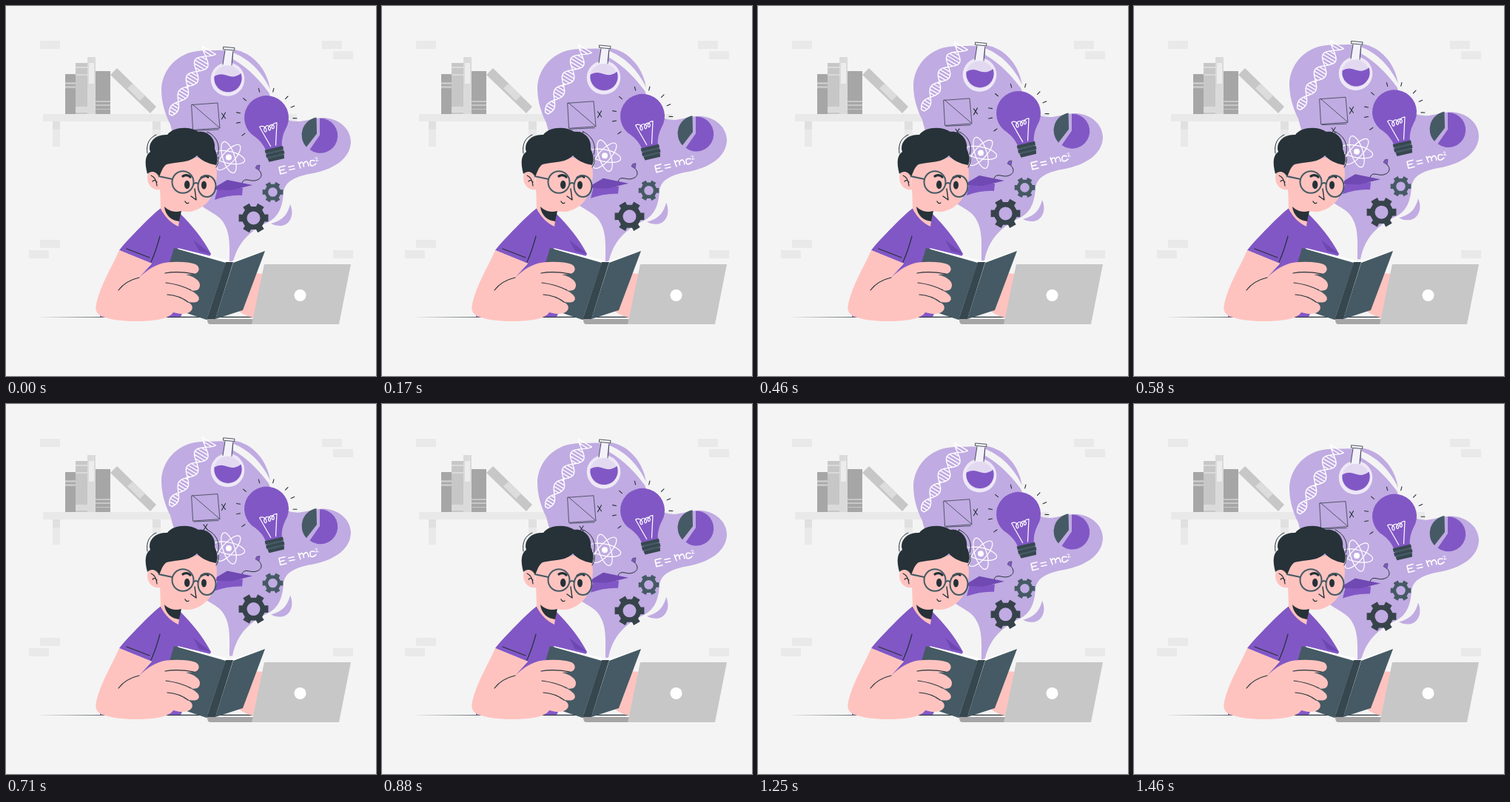
Animation of 500x500 px, one loop 1.5 s. Source, as an HTML page:

```html
<!DOCTYPE html>
<html lang="en">
<head>
<meta charset="utf-8">
<title>Reading and ideas</title>
<style>
  html, body { margin: 0; width: 100%; height: 100%; overflow: hidden; background: #f4f4f4; }
  svg { display: block; width: 100%; height: 100%; }
  .ink { fill: none; stroke: #263238; stroke-linecap: round; stroke-linejoin: round; }
  .chalk { fill: none; stroke: #fff; stroke-linecap: round; stroke-linejoin: round; }
  .violet { fill: #8157c5; }
  .lilac { fill: #c0abe2; }
  .skin { fill: #ffc3bf; }
  .dark { fill: #263238; }
</style>
</head>
<body>
<svg viewBox="0 0 500 500" xmlns="http://www.w3.org/2000/svg">
  <rect width="500" height="500" fill="#f4f4f4"/>

  <g id="bricks" fill="#e9e9e9"></g>

  <g id="shelf">
    <path d="M63 156h10v34h-10zM198 156h11v34h-11z" fill="#e9e9e9"/>
    <path d="M63 156h10v11h-10zM198 156h11v11h-11z" fill="#e0e0e0"/>
    <path d="M50 146H393V156H50z" fill="#e9e9e9"/>
    <path d="M80 92h14v54h-14z" fill="#a6a6a6"/>
    <path d="M80 103h14v3h-14zM80 108h14v3h-14z" fill="#c7c7c7"/>
    <path d="M94 77h16v69h-16z" fill="#c7c7c7"/>
    <path d="M94 82h16v2h-16zM94 92h16v2h-16zM94 136h16v8h-16z" fill="#dadada"/>
    <path d="M110 69h11v77h-11z" fill="#dadada"/>
    <path d="M112 77h7v28h-7z" fill="#ececec"/>
    <path d="M121 88h20v58h-20z" fill="#a6a6a6"/>
    <path d="M121 128h20v2h-20zM121 133h20v2h-20zM121 139h20v1h-20z" fill="#c7c7c7"/>
    <path d="M150 84L203 136 195 145 141 93z" fill="#c7c7c7"/>
    <path d="M171 105L188 121 181 128 164 111z" fill="#dcdcdc"/>
  </g>

  <path d="M42 420.4L200 419.8H333V420.9H200z" class="dark"/>

  <g id="idea">
    <path class="lilac" d="M302 350C302 325 304 306 292 290C285 281 272 277 262 268L235 200
      C229 186 225 172 222 160C213 142 210 127 210 112C211 93 222 75 241 66C252 60 268 60 282 60
      Q296 59 308 62C332 76 349 96 356 119C360 137 369 150 384 155C400 159 412 151 430 151
      C452 153 466 167 466 184C465 208 440 221 415 226C392 230 378 236 375 251
      C374 272 368 287 350 294C331 304 312 319 306 350z"/>
    <path class="lilac" d="M308 59C334 63 353 86 357 113C349 95 334 76 308 66z"/>
    <path fill="#f4f4f4" d="M307 63C334 74 349 95 357 113L356 118C344 102 328 84 307 72z"/>
    <path class="lilac" d="M384 268C391 284 382 298 369 297Q363 297 358 294C372 290 380 284 384 268z"/>

    <g id="helix" class="chalk" stroke-width="1.4"></g>

    <g id="flask">
      <circle cx="299.5" cy="99" r="22.8" fill="#eee8f7"/>
      <path d="M294 56L309 57 308 60 306 61 304 81 293 80 296 60 294 59z" fill="#f4f1fa"/>
      <path class="ink" stroke-width=".8" d="M294 55.2L309 56.6 308.6 60 293.8 58.6zM296 60L293 79M307 61L305 80"/>
      <circle cx="299.5" cy="99" r="18.7" fill="#e2d9f1"/>
      <path class="violet" d="M281.500 95Q289 90 299 94T317.500 91A18.700 18.700 0 1 1 281.500 95z"/>
    </g>

    <g class="ink" stroke-width=".7">
      <path d="M251 133.500L286 131 289 165 253 167.500zM252 133L288 164M254 168.500L287 167"/>
      <path stroke-width="1.100" d="M291.500 145L296.500 152M296.500 144L291.500 153M267 172.500L272 179M272 172L267 180"/>
    </g>

    <g id="rays" class="ink" stroke-width="1.1"></g>
    <g transform="translate(352 151) rotate(-13.500)">
      <path class="violet" d="M-11 43Q-13 31 -21 21.500A30 30 0 1 1 21 21.500Q13 31 11 43z"/>
      <path class="chalk" stroke-width="1.200" d="M-3.500 39L-12 10C-8 8 -3 12 -4 17C-6 21 -9 15 -5 12
        C-1 9 3 12 2 16C0 20 -3 15 1 12C5 9 8 12 7 15C5 19 2 14 6 11Q9 9 12 10L3.500 39"/>
      <path fill="#37474f" d="M-12.500 42h25v5h-25zM-12.500 48h25v5h-25zM-11.500 54h23l-1 5h-21z"/>
      <path fill="#455a64" d="M-11 46h22v2.500h-22zM-11 52h22v2.500h-22z"/>
    </g>

    <path fill="#455a64" d="M420 172.500L419.500 150.500A24 24 0 0 0 406 190.500z"/>
    <path class="violet" d="M424 174.500V151.800A23.500 23.500 0 1 1 410.500 194z"/>

    <path class="chalk" stroke-width="1.600" d="M377 216L369 218 371 227 379 225M370 222.500L376 221
      M382 217.500L389 216M383 221.500L390 220
      M395 211L398 219M396 214Q401 207 402.500 217M402 213Q407 206 409 216
      M417 209Q410 207 411 213T419 213"/>
    <path class="chalk" stroke-width="1" d="M417.500 206Q420 203 420.500 206L419 209.500 422 209"/>

    <g id="atom" class="chalk" stroke-width="1.200"></g>
    <circle cx="301" cy="204.500" r="4" fill="#fff"/>

    <path class="violet" d="M286 246L320 246 319 256Q301 255 282 262z"/>
    <path fill="#7049b3" d="M277 248L299 235 333 242 304 249z"/>
    <path class="ink" stroke-width="1" d="M319 239C322 231 329 237 336 236C347 234 347 226 341 221"/>
    <path class="violet" stroke="#263238" stroke-width=".5" d="M342 222L337 219 339 215.500 343 215z"/>

    <path id="gearA" fill="#37434b" fill-rule="evenodd"/>
    <path id="gearB" fill="#455a64" fill-rule="evenodd"/>
  </g>

  <g id="reader">
    <path class="skin" d="M335 361L348 362 334 421Q324 420 313 411z"/>
    <path class="violet" d="M212 271C198 281 165 315 153 330L197 348 180 366 127 418 127 420H236L277 335
      C266 314 251 296 234 279z"/>
    <path fill="#6d48b1" d="M253 316L277 335 261 331z"/>
    <path class="skin" d="M208 245L209 274C215 286 224 294 233 298L237 268z"/>
    <path class="dark" d="M214 271C221 278 228 279 237 277L234 291C224 290 215 283 214 271z"/>
    <path class="ink" stroke-width="1.200" d="M208 311Q203 330 196 346M163 328L194 340"/>

    <path class="skin" d="M210 205H281C287 222 286 238 279 255C272 270 256 279 243 278C225 277 213 262 207 246z"/>
    <path class="skin" d="M207 229C201 219 191 222 191 232C191 242 199 250 208 248z"/>
    <path class="ink" stroke-width="1.200" d="M196 229Q203 232 204 243M198 237Q201 234 204 238"/>
    <path class="dark" d="M191 227C187 211 188 202 195 197C191 185 201 173 218 174C226 163 248 162 260 170
      C273 168 284 180 282 193C286 202 287 209 284 215C272 213 263 208 258 202C248 212 235 210 217 214
      C212 217 210 224 207 231C203 223 196 222 191 227z"/>
    <path class="ink" stroke-width="1" d="M191 199C189 186 194 178 203 174M272 170C285 176 290 189 286 201M287 204Q288 212 284 218"/>

    <ellipse cx="244.700" cy="241.500" rx="3.700" ry="5.700" class="dark"/>
    <ellipse cx="267.500" cy="242" rx="3.500" ry="5.500" class="dark"/>
    <path class="ink" stroke-width="3.200" d="M239 230Q245 227 249 231M264 232Q270 228 273 231"/>
    <path class="ink" stroke-width="1.400" d="M255 247L257 262 250 257M242 264Q244 268 247 266"/>
    <g fill="none" stroke="#455a64" stroke-width="2">
      <ellipse cx="239" cy="238" rx="14.500" ry="14.800"/>
      <ellipse cx="271.500" cy="243.500" rx="12" ry="14.500"/>
      <path d="M253 241Q257 237 260 241M225 234L206 230"/>
    </g>
  </g>

  <g id="book">
    <path fill="#fff" d="M232 327L297 343Q302 347 307 344L346 332 330 360 302 365 240 345z"/>
    <path fill="#455a64" d="M227 327L297 347 271 424 205 402z"/>
    <path fill="#455a64" d="M307 347L350 331 320 411 283 423z"/>
    <path fill="#37474f" d="M297 346H307L283 423 271 424z"/>
  </g>

  <g id="arm">
    <path class="skin" d="M153 330L197 348 180 367C192 355 207 346 224 346Q244 345 256 349
      C263 352 262 361 254 362L243 363C253 365 263 371 262 378C261 386 254 385 248 384
      C258 388 263 394 260 398C257 402 250 400 245 400C253 403 253 409 250 412C246 417 236 417 226 414
      C220 424 196 426 175 426C157 426 142 424 128 419Q119 414 122 402C128 376 142 355 153 330z"/>
    <path class="ink" stroke-width="1.200" d="M152 384Q162 371 180 367M215 361Q232 358 254 362M216 374Q234 376 250 384
      M218 390Q234 391 246 400"/>
  </g>

  <g id="laptop">
    <path fill="#a6a6a6" d="M272 423H340V430H275Q272 429 272 423z"/>
    <path fill="#c7c7c7" d="M349 349H466L450 430H332z"/>
    <circle cx="397.500" cy="391" r="8" fill="#fff"/>
  </g>
</svg>
<script>
  const $ = id => document.getElementById(id);
  const rad = deg => deg * Math.PI / 180;
  const polar = (x, y, r, a) => [x + r * Math.cos(a), y + r * Math.sin(a)].map(v => v.toFixed(2)).join(' ');
  const line = pts => 'M' + pts.join('L');

  $('bricks').innerHTML = [[46, 47], [427, 47], [442, 61], [46, 316], [31, 330], [442, 330]]
    .map(([x, y]) => `<rect x="${x}" y="${y}" width="27" height="11"/>`).join('');

  function gear(x, y, r, hole) {
    const pts = [], teeth = 6, step = 2 * Math.PI / teeth;
    for (let i = 0; i < teeth; i++)
      for (const [k, f] of [[-.29, .77], [-.23, 1], [.23, 1], [.29, .77]])
        pts.push(polar(x, y, r * f, (i + k) * step));
    return `${line(pts)}ZM${x - hole} ${y}a${hole} ${hole} 0 1 0 ${2 * hole} 0a${hole} ${hole} 0 1 0 ${-2 * hole} 0z`;
  }
  $('gearA').setAttribute('d', gear(334.5, 286.5, 20.5, 9));
  $('gearB').setAttribute('d', gear(360.5, 251.5, 14.2, 6.3));

  $('atom').innerHTML = [12, 72, 132]
    .map(a => `<ellipse cx="301" cy="204.5" rx="22" ry="8" transform="rotate(${a} 301 204.5)"/>`).join('');

  $('rays').innerHTML = [144, 170, 190, 220, 255, 284, 315, 337, 1]
    .map(a => `<path d="${line([36, 41].map(r => polar(352, 151, r, rad(a))))}"/>`).join('');

  // Two mirrored waves along a slanted axis, joined by rungs.
  function helix() {
    const x0 = 222.5, y0 = 147, dx = 52, dy = -87, len = Math.hypot(dx, dy);
    const at = (u, side) => {
      const w = side * (5 + 6 * u) * Math.sin(Math.PI * (4.25 * u - .86));
      return [x0 + dx * u - dy / len * w, y0 + dy * u + dx / len * w].map(v => v.toFixed(2)).join(' ');
    };
    const us = Array.from({ length: 61 }, (_, i) => i / 60);
    let d = line(us.map(u => at(u, 1))) + line(us.map(u => at(u, -1)));
    for (let u = 0; u <= 1; u += 1 / 24) d += line([at(u, 1), at(u, -1)]);
    return `<path d="${d}"/>`;
  }
  $('helix').innerHTML = helix();

  const LOOP = 1500, STEPS = 36, RISE = 10, REST = .55;

  // Steady rise and fall; the loop opens one step into the rise.
  function draw(ms) {
    const step = Math.floor((ms % LOOP + 4) * STEPS / LOOP) + 1;
    const u = step % STEPS / STEPS;
    const y = REST - RISE * (1 - Math.abs(1 - 2 * u));
    $('idea').setAttribute('transform', `translate(0 ${y.toFixed(3)})`);
  }

  const start = performance.now();
  function tick() {
    draw(performance.now() - start);
    requestAnimationFrame(tick);
  }
  tick();
</script>
</body>
</html>
```
